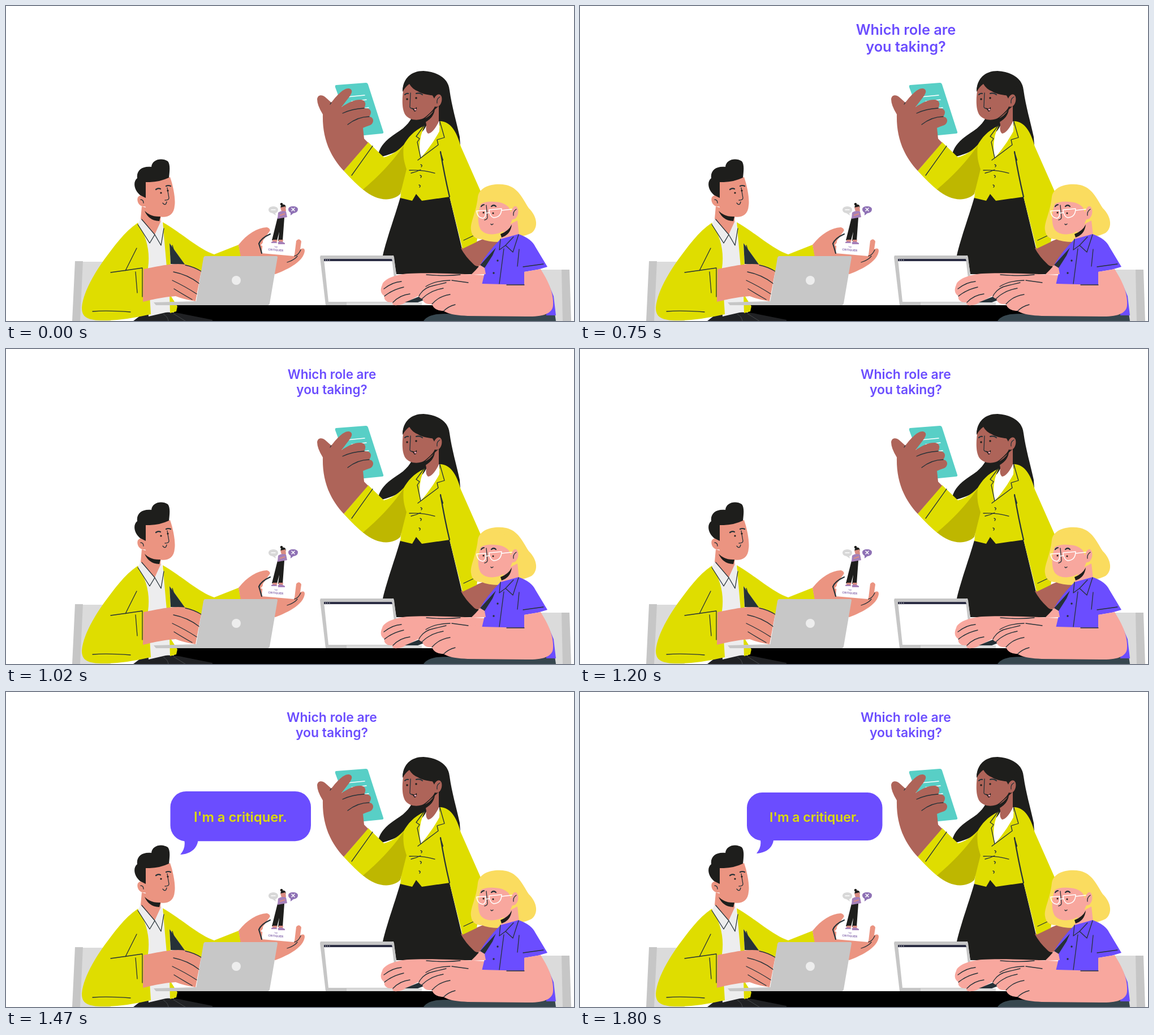
Recreate the animation shown at these times as an HTML page. Size 1004x558 px, loop 2.28 s.

```html
<!DOCTYPE html>
<html lang="en">
<head>
<meta charset="utf-8">
<title>Which role are you taking?</title>
<style>
  html, body { margin: 0; width: 100%; height: 100%; overflow: hidden; background: #fff; }
  svg { display: block; width: 100%; height: 100%; }
  text { font: 600 22.95px Inter, sans-serif; text-anchor: middle; }
  .black { fill: #1e1e1c; }
  .yellow { fill: #dfdd00; }
  .shade { fill: #beb700; }
  .violet { fill: #6b4dff; }
  .white { fill: #fff; }
  .light { fill: #dbdbdb; }
  .grey { fill: #c6c6c6; }
  .brown { fill: #ae6459; }
  .tan { fill: #eb9481; }
  .pink { fill: #f8a79e; }
  .blond { fill: #fadc5f; }
  .line { fill: none; stroke: #263238; stroke-width: 1.3; stroke-linecap: round; stroke-linejoin: round; }
  .thick { stroke-width: 2.2; }
  .pale { fill: none; stroke: #fff; stroke-width: 1.5; stroke-linecap: round; stroke-linejoin: round; }
</style>
</head>
<body>
<svg viewBox="0 0 1004 558">

  <g id="chairs">
    <path class="light" d="M135 453H185V558H128Z M940 467H984L986 558H940Z"/>
    <path class="grey" d="M122 452H136L131 558H117Z M982 467H996L999 558H984Z"/>
  </g>

  <g id="presenter">
    <path class="black" d="M701 150C702 128 716 115 738 115Q753 116 763 121Q782 130 784 149C788 178 796 204 802 232L803 247L770 212L743 215C715 245 690 263 657 268C659 249 672 237 690 225C708 214 716 203 722 187Z"/>
    <path class="black" d="M697 339C689 368 674 408 666 442H685L690 475H824C834 473 838 468 836 462L806 430L784 338L735 330Z"/>
    <path class="brown" d="M804 429L845 412L872 417L840 459Q832 464 826 457Q812 444 804 429Z"/>
    <path class="white" d="M743 212L766 204L767 226L733 270Q727 235 743 212Z"/>
    <path class="brown" d="M741 199L765 177V205Q755 225 746 226Q741 222 743 211Z"/>
    <path class="brown" d="M703 143C700 163 699 182 706 193C714 204 733 204 742 196C752 188 757 181 758 178C766 181 772 171 770 161C767 153 759 157 757 164L752 155L715 136Z"/>
    <path class="black" d="M701 152C702 130 714 117 736 116L778 133L759 159C748 158 735 156 728 151Q718 147 713 138Q706 143 701 152Z"/>
    <path class="black" d="M736 201Q750 197 758 182Q757 197 741 206Z"/>
    <path class="line" d="M715 154L714 177Q713 181 719 182M762 172Q761 164 767 161"/>
    <path class="line thick" d="M705 157Q708 154 711 155M725 155Q731 153 736 157"/>
    <g class="black"><circle cx="709" cy="165" r="1.7"/><circle cx="725" cy="163" r="1.7"/><path d="M717 180Q722 184 726 179Q727 186 722 187Z"/></g>
    <ellipse cx="723.500" cy="183.500" rx="2" ry="1.800" fill="#ef9cad"/>

    <path class="yellow" d="M740 212C720 221 710 234 703 246Q687 263 668 268L640 241L597 292Q618 315 632 326L703 285L697 340L718 345L725 333L735 345L784 338L807 430L832 418L845 342L804 249C796 221 786 205 767 204L766 222Q752 248 733 269Q727 238 740 212Z"/>
    <path class="shade" d="M631 325Q676 287 703 247C701 267 704 277 708 289L697 333C681 348 654 345 631 325Z"/>
    <path class="line" d="M739 212L725 231L731 235L727 241L733 269M767 205L775 233L762 237L764 246L728 273M713 291Q737 290 758 296M716 296Q725 294 733 290M733 281q4 1 1 4M732 300q4 1 1 4M730 317q4 1 1 4M648 248L611 300M809 415L828 406"/>
    <path class="line thick" d="M768 258Q775 300 784 338M768 260L772 273"/>

    <path d="M584 140L636 136Q639 136 640 139L667 223Q668 226 664 226L614 231L582 144Q581 140 584 140Z" fill="#58cfc6"/>
    <path class="pale" d="M603 161L634 158M611 169L637 166M635 181L641 180"/>
    <path class="brown" d="M597 292C570 263 559 230 560 192Q550 176 550 165C551 156 560 157 565 162L575 171C585 158 597 145 606 146C614 148 612 154 606 162L593 179Q614 165 627 166C636 167 637 174 633 181C645 180 648 188 642 196C651 197 651 207 644 211Q635 214 631 216L633 235L640 242Z"/>
    <path class="line" d="M595 190Q612 182 633 181M604 210Q622 196 642 196M575 171L573 174"/>
  </g>

  <path d="M302 530H800V558H290Z"/>

  <g id="seated-man">
    <path d="M225 558L238 548Q285 538 315 546L365 556V558Z" fill="#202124"/>
    <path d="M278 546Q286 550 287 558M296 545L317 558" fill="none" stroke="#45494b"/>
    <path fill="#ededee" d="M237 377L275 380L280 405L288 424L295 540L252 550L244 420Z"/>
    <path class="yellow" d="M233 384C208 401 191 426 173 450C154 477 136 509 134 534C134 552 144 558 180 557Q213 556 256 546L251 464Q257 422 233 384Z"/>
    <path class="yellow" d="M277 383C309 401 341 431 368 440L411 423L416 446L345 473L316 458L289 420L291 462H284L279 405Z M289 510L303 532L301 541L290 544Z"/>
    <path d="M289 420L317 459L291 457Z" fill="#263238"/>
    <path class="tan" d="M240 355L238 377L263 405L273 383L274 365Z"/>
    <path class="tan" d="M246 312L290 303C296 320 300 343 298 354C297 371 284 376 270 373Q252 369 246 355C237 357 230 347 233 339Q238 332 246 339Z"/>
    <path class="black" d="M245 363Q256 374 273 373L271 381Q253 381 245 363Z"/>
    <path class="black" d="M247 340L237 335C226 326 224 311 232 305C230 291 241 283 257 285C258 272 275 268 286 275C291 281 289 294 288 304Q269 313 247 312Z"/>
    <path class="line" d="M285 322L288 340Q288 344 281 344M277 349Q282 355 284 347M238 343Q243 343 243 349"/>
    <path class="line thick" d="M265 325Q269 322 273 324M283 319Q287 317 291 319"/>
    <g class="black"><circle cx="274" cy="331" r="1.6"/><circle cx="286" cy="327" r="1.6"/></g>
    <path d="M238 377L233 387L254 420L263 405L274 424L279 394L273 383L263 405Z" fill="#ededee"/>
    <path class="line" d="M233 387L254 420L263 405L274 424L279 394M263 405L240 378M231 429L211 469M185 472Q214 468 241 464L241 515M229 471L232 508M153 541Q180 539 220 542M294 424L300 445"/>
    <path class="tan" d="M243 466C266 462 294 454 318 458Q333 462 345 470L335 523Q315 520 300 514C280 515 258 520 242 524Z"/>
    <path class="line" d="M296 471Q322 476 342 492M294 486Q317 497 337 510M297 501Q313 511 329 520M317 459Q332 462 345 470"/>
    <path class="grey" d="M261 525L336 523V530H265Z"/>
  </g>

  <g id="card-hand">
    <path class="tan" d="M411 423C427 403 444 393 461 392C469 394 468 401 463 409L450 424L510 441L513 416Q518 410 522 417L520 431Q528 427 528 434C526 452 500 466 476 475L415 445Z"/>
    <path class="white" d="M468 396L454 416L452 438L509 443L512 415Z"/>
    <path class="line thick" d="M467 404Q451 411 447 421Q449 427 452 438"/>
    <path class="line" d="M510 443Q517 441 521 432M497 454Q510 450 515 443"/>
    <g class="black">
      <circle cx="487" cy="351" r="2.3"/><circle cx="490" cy="356" r="4.6"/>
      <path d="M480 375H492L489 416H481L483 400L479 415H470Z"/>
    </g>
    <path fill="#d98c82" d="M485 357L494 355L495 363Q491 368 487 364Z M472 414H480L478 419H470Z M482 414H490L489 419H482Z"/>
    <path fill="#a580b9" d="M481 366Q487 361 495 364L497 374L480 377Z M469 418Q476 415 480 420H469Z M481 418Q488 416 493 420V422H481Z"/>
    <path d="M484 371L493 368" stroke="#d98c82" stroke-width="2"/>
    <path fill="#d8d8d8" d="M464 361C464 353 481 353 481 361Q481 365 476 367L477 371L471 367Q464 366 464 361Z"/>
    <path fill="#8e71b5" d="M499 360C499 353 516 353 516 360Q516 366 508 367L503 371V366Q499 364 499 360Z"/>
    <path class="pale" d="M469 361H476M505 358L510 363M510 358L505 363"/>
    <g fill="#7c5ca7" transform="rotate(4 477 430)"><text x="477" y="428" style="font-size:3px">THE</text><text x="477" y="434" style="font-size:5px">CRITIQUER</text></g>
  </g>

  <g id="laptops">
    <path d="M352 443H478Q480 443 480 445L466 527Q465 530 462 530H335L349 446Q350 443 352 443Z" fill="#c7c7c7"/>
    <circle cx="407" cy="486" r="8" fill="#ededed"/>
    <path class="grey" d="M556 442H683Q685 442 686 445L696 530H565L555 445Z"/>
    <path class="white" d="M562 448H682L691 524H570Z"/>
    <path d="M562 448H682L683 452H562Z" fill="#2b2d43"/>
    <path d="M564 450H574" stroke="#fff" stroke-dasharray="1.5 2"/>
    <path class="light" d="M602 525H735V530H602Z"/>
  </g>

  <g id="seated-woman">
    <path class="pink" d="M848 477C802 474 741 472 711 474C692 475 667 483 665 494C661 503 662 509 669 514C667 521 674 526 683 525C682 532 692 531 701 528L736 510L846 494Z"/>
    <path class="line" d="M668 501Q683 489 699 488M669 514Q684 502 703 498M684 525Q696 512 714 510M743 476Q777 479 803 476"/>
    <path d="M705 525Q724 517 737 512L744 519L728 525Z" fill="#263238"/>
    <path d="M738 558C747 545 768 544 795 546L970 544L972 558Z" fill="#37474f"/>
    <path class="blond" d="M834 338C837 319 863 313 884 317C905 322 912 339 924 358C940 374 941 393 929 402Q919 407 910 408L872 418Q852 418 841 413Q824 413 822 397C820 383 831 367 834 338Z"/>
    <path class="pink" d="M884 390L904 380L907 407Q890 420 880 432L873 415Z"/>
    <path class="pink" d="M842 344C834 360 832 384 839 396C848 408 870 406 882 397Q890 392 895 378C905 379 909 361 902 355C896 353 893 361 893 366L884 346L858 339Z"/>
    <path class="blond" d="M837 352C838 330 852 324 866 324Q892 327 902 349L893 362Q884 348 866 347Q848 345 837 352Z"/>
    <path class="black" d="M874 404Q888 399 894 387Q892 405 876 410Z"/>
    <path class="line" d="M849 353L851 374Q851 378 846 379M857 386Q858 389 861 386M897 371Q896 364 902 360"/>
    <path class="line thick" d="M840 355Q842 352 845 352M858 355Q862 351 866 355"/>
    <g class="black"><circle cx="844" cy="366" r="1.5"/><circle cx="861" cy="367" r="1.5"/></g>
    <path class="pale" d="M832 363L848 362Q849 375 843 376Q833 375 832 363ZM854 361L876 359Q876 374 862 375Q855 373 854 361ZM848 367L854 366M876 362L894 360"/>

    <path class="violet" d="M874 413L906 404Q929 412 936 427L957 462L940 467L916 471V494H841L846 473L838 459Q850 437 874 413Z M960 495L968 514L972 548H955Z"/>
    <path d="M866 428L838 459L846 464L860 442Z" fill="#263238"/>
    <path class="pink" d="M848 475L846 464L838 459L830 468L822 476Z"/>
    <path class="line" d="M874 413L872 432L883 424L896 436L906 405M883 424L897 409M880 430L872 492M907 431L904 461M914 462L950 457"/>
    <g fill="#263238"><circle cx="869" cy="451" r="1.7"/><circle cx="862" cy="473" r="1.7"/></g>
    <path class="pink" d="M842 492C810 484 774 483 750 490C735 495 726 505 729 514Q733 519 736 518C737 527 746 529 753 528C756 538 766 540 773 540C784 547 800 548 816 549L920 550C951 551 967 544 967 529C968 506 957 485 945 466L916 471V494Z"/>
    <path class="line" d="M730 514Q737 499 757 495L778 490M736 518Q750 504 773 500M753 528Q765 514 785 511M774 540Q782 532 794 529M742 497Q759 486 785 486M788 486L817 490M916 494H885"/>
  </g>

  <g id="question" class="violet">
    <text x="576" y="53">Which role are</text>
    <text x="576" y="80">you taking?</text>
  </g>

  <g id="answer">
    <path class="violet" d="M322 178H507.500A27 27 0 0 1 534.500 205V236A27 27 0 0 1 507.500 263H342C340 276 329 285 312 286Q321 275 319 263A27 27 0 0 1 295 236V205A27 27 0 0 1 322 178Z"/>
    <text class="yellow" x="414.500" y="230">I'm a critiquer.</text>
  </g>
</svg>

<script>
  const LOOP = 2280, STEP = 30;
  const popKeys = [[0, 0], [170, 1.12], [370, 0.955], [590, 1]];
  const pops = [
    { id: "question", start: 540, x: 576, y: 72 },
    { id: "answer", start: 1200, x: 414.8, y: 231.8 }
  ].map(pop => ({ ...pop, node: document.getElementById(pop.id) }));

  // Overshoot, dip below full size, then settle.
  function popScale(time) {
    if (time <= 0) return 0;
    const next = popKeys.findIndex(([at]) => time < at);
    if (next < 0) return 1;
    const [from, low] = popKeys[next - 1], [to, high] = popKeys[next];
    const eased = (1 - Math.cos(Math.PI * (time - from) / (to - from))) / 2;
    return low + (high - low) * eased;
  }

  function render(now) {
    const time = Math.floor((now % LOOP) / STEP) * STEP;
    for (const { node, start, x, y } of pops) {
      const scale = popScale(time - start);
      node.style.display = scale ? "" : "none";
      node.setAttribute("transform", `translate(${x} ${y}) scale(${scale}) translate(${-x} ${-y})`);
    }
  }

  let origin;
  function tick(now) {
    origin ??= now;
    render(Math.max(0, now - origin));
    requestAnimationFrame(tick);
  }
  render(0);
  requestAnimationFrame(tick);
</script>
</body>
</html>
```
